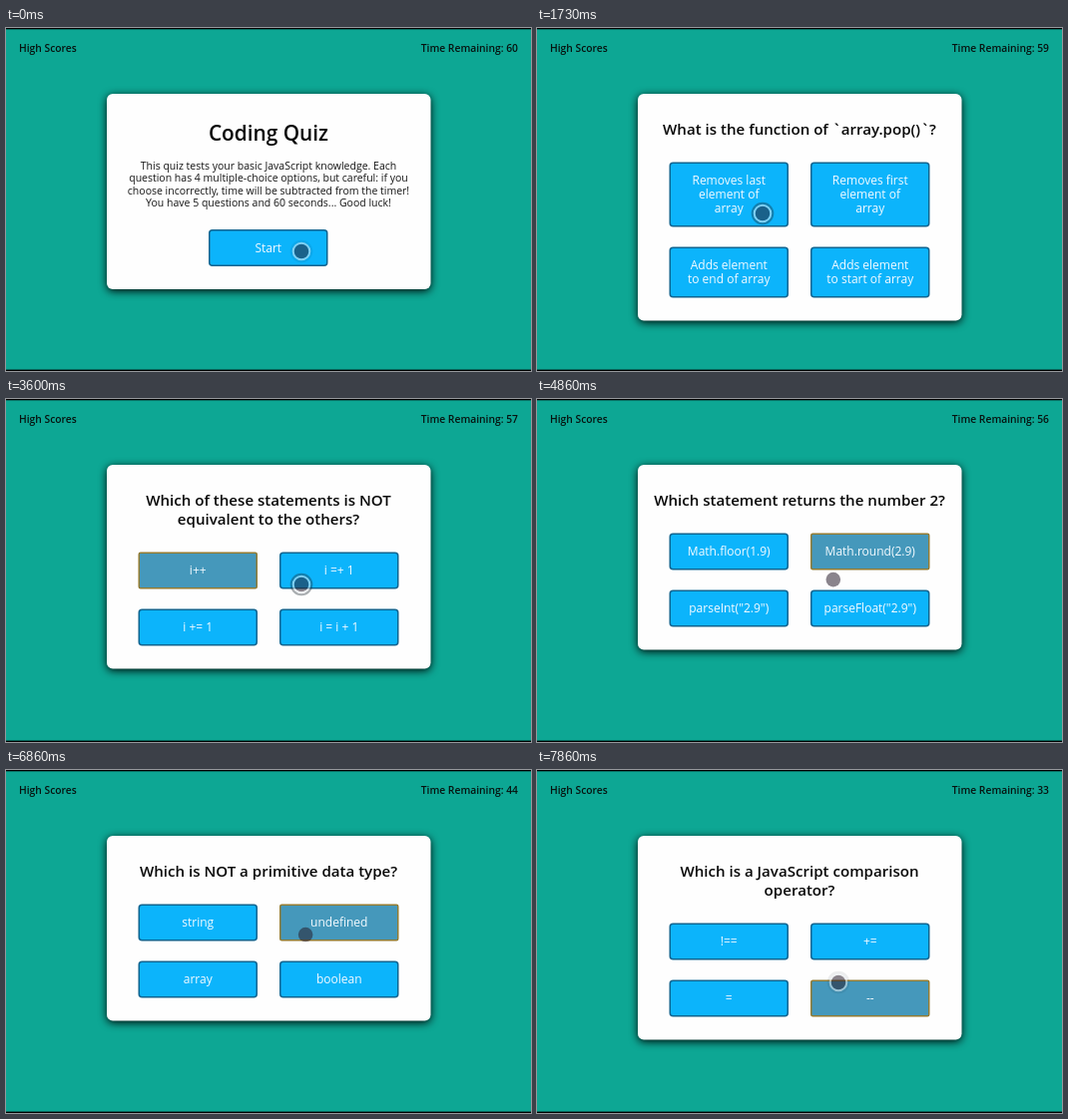
Recreate the animation shown at these times as an HTML page with a canvas. Size 526 px wide and 344 px high, loop 8000 ms.

```html
<!DOCTYPE html>
<html lang="en">
<head>
<meta charset="utf-8">
<title>Coding Quiz</title>
<style>
  html, body { margin: 0; width: 100%; height: 100%; overflow: hidden; background: #0da794; }
  canvas { display: block; width: 526px; height: 344px; }
</style>
</head>
<body>
<canvas id="stage" width="526" height="344"></canvas>
<script>
const W = 526, H = 344, LOOP = 8000;
const ctx = document.getElementById('stage').getContext('2d');
const FONT = '"Open Sans", "Noto Sans", sans-serif';

// Each screen starts at `at`; `focus` is the button tapped just before.
const screens = [
  { at: 0 },
  { at: 440, focus: -1,
    question: ['What is the function of `array.pop()`?'],
    options: [['Removes last', 'element of', 'array'], ['Removes first', 'element of', 'array'],
              ['Adds element', 'to end of array'], ['Adds element', 'to start of array']] },
  { at: 2130, focus: 0,
    question: ['Which of these statements is NOT', 'equivalent to the others?'],
    options: [['i++'], ['i =+ 1'], ['i += 1'], ['i = i + 1']] },
  { at: 4060, focus: 1,
    question: ['Which statement returns the number 2?'],
    options: [['Math.floor(1.9)'], ['Math.round(2.9)'], ['parseInt("2.9")'], ['parseFloat("2.9")']] },
  { at: 5200, focus: 1, penalty: 10,
    question: ['Which is NOT a primitive data type?'],
    options: [['string'], ['undefined'], ['array'], ['boolean']] },
  { at: 7800, focus: 3, penalty: 10,
    question: ['Which is a JavaScript comparison', 'operator?'],
    options: [['!=='], ['+='], ['='], ['--']] }
];

const intro = [
  'This quiz tests your basic JavaScript knowledge. Each',
  'question has 4 multiple-choice options, but careful: if you',
  'choose incorrectly, time will be subtracted from the timer!',
  'You have 5 questions and 60 seconds... Good luck!'
];

// Pointer moves: start, end, destination
const home = [296, 224];
const moves = [
  [1390, 1660, 226, 186],
  [3250, 3540, 296, 186],
  [4800, 5010, 300, 162],
  [6800, 7210, 302, 213]
];

// Pointer presses: down, up
const presses = [[-100, 440], [1570, 2130], [3440, 4060], [4960, 5200], [7200, 7800]];

const clamp = v => Math.max(0, Math.min(1, v));
const ease = v => v * v * (3 - 2 * v);

function text(str, x, y, size, weight, color, align = 'center') {
  ctx.font = `${weight} ${size}px ${FONT}`;
  ctx.fillStyle = color;
  ctx.textAlign = align;
  ctx.fillText(str, x, y);
}

function box(x, y, w, h, r) {
  ctx.beginPath();
  ctx.roundRect(x, y, w, h, r);
}

function card(bottom) {
  ctx.save();
  ctx.shadowColor = 'rgba(0,0,0,.95)';
  ctx.shadowBlur = 9;
  ctx.shadowOffsetY = 2;
  ctx.fillStyle = '#fefefe';
  box(101, 66, 324.5, bottom - 66, 6);
  ctx.fill();
  ctx.restore();
}

function button(x, y, h, lines, focused) {
  box(x + 0.75, y + 0.75, 118, h - 1.5, focused ? 1.5 : 3);
  ctx.fillStyle = focused ? '#4598bb' : '#0cb4fb';
  ctx.fill();
  ctx.lineWidth = 1.5;
  ctx.strokeStyle = focused ? '#917b32' : '#0d6490';
  ctx.stroke();
  const first = y + h / 2 + 4.2 - (lines.length - 1) * 7;
  lines.forEach((line, i) => text(line, x + 59.75, first + i * 14, 12, 500, '#f4fbff'));
}

function introScreen() {
  card(262);
  text('Coding Quiz', 263, 112.5, 20.8, 600, '#080808');
  intro.forEach((line, i) => text(line, 263, 141.8 + i * 12.4, 10.5, 400, '#151515'));
  button(203, 202, 37, ['Start'], false);
}

function quizScreen({ question, options, focus }) {
  const height = i => Math.max(options[i].length, options[i + 1].length) * 14 + 23;
  const top = 134.5 + (question.length - 1) * 19;
  const rows = [top, top + height(0) + 20];
  card(rows[1] + height(2) + 23);
  question.forEach((line, i) => text(line, 263, 107 + i * 19, 15.1, 600, '#080808'));
  options.forEach((lines, i) => {
    const row = i >> 1;
    button(i % 2 ? 274 : 132.5, rows[row], height(row * 2), lines, i === focus);
  });
}

function pointerAt(t) {
  let [x, y] = home;
  for (const [start, end, toX, toY] of moves) {
    const k = ease(clamp((t - start) / (end - start)));
    x += (toX - x) * k;
    y += (toY - y) * k;
  }
  return [x, y];
}

function pressAt(t) {
  return Math.max(...presses.map(([down, up]) =>
    Math.min(clamp((t - down) / 170), 1 - clamp((t - up) / 150))));
}

function ring(x, y, r, width, color) {
  ctx.beginPath();
  ctx.arc(x, y, r, 0, Math.PI * 2);
  ctx.lineWidth = width;
  ctx.strokeStyle = color;
  ctx.stroke();
}

function pointer(t) {
  const [x, y] = pointerAt(t);
  const p = pressAt(t);
  ctx.beginPath();
  ctx.arc(x, y, 7.3, 0, Math.PI * 2);
  ctx.fillStyle = 'rgba(38,28,42,.54)';
  ctx.fill();
  if (p > 0) {
    ring(x, y, 8.3, 2, `rgba(225,232,235,${0.55 * clamp(p * 2)})`);
    ring(x, y, 10.3, 2, `rgba(30,40,48,${0.42 * clamp(p * 2 - 1)})`);
  }
}

function secondsLeft(t) {
  const ticks = Math.max(0, Math.floor((t - 440) / 1000));
  const lost = screens.reduce((sum, s) => sum + (t >= s.at ? s.penalty || 0 : 0), 0);
  return 60 - ticks - lost;
}

function draw(t) {
  ctx.fillStyle = '#0da794';
  ctx.fillRect(0, 0, W, H);
  ctx.fillStyle = '#000';
  ctx.fillRect(0, 0, W, 1.3);
  ctx.fillRect(0, H - 1.4, W, 1.4);

  text('High Scores', 13, 24, 10.3, 600, '#07120f', 'left');
  text('Time Remaining: ' + secondsLeft(t), 513, 24, 10.3, 600, '#07120f', 'right');

  const screen = screens.filter(s => t >= s.at).pop();
  if (screen.question) quizScreen(screen);
  else introScreen();
  pointer(t);
}

const begin = performance.now();
function frame() {
  draw((performance.now() - begin) % LOOP);
  requestAnimationFrame(frame);
}
frame();
</script>
</body>
</html>
```
